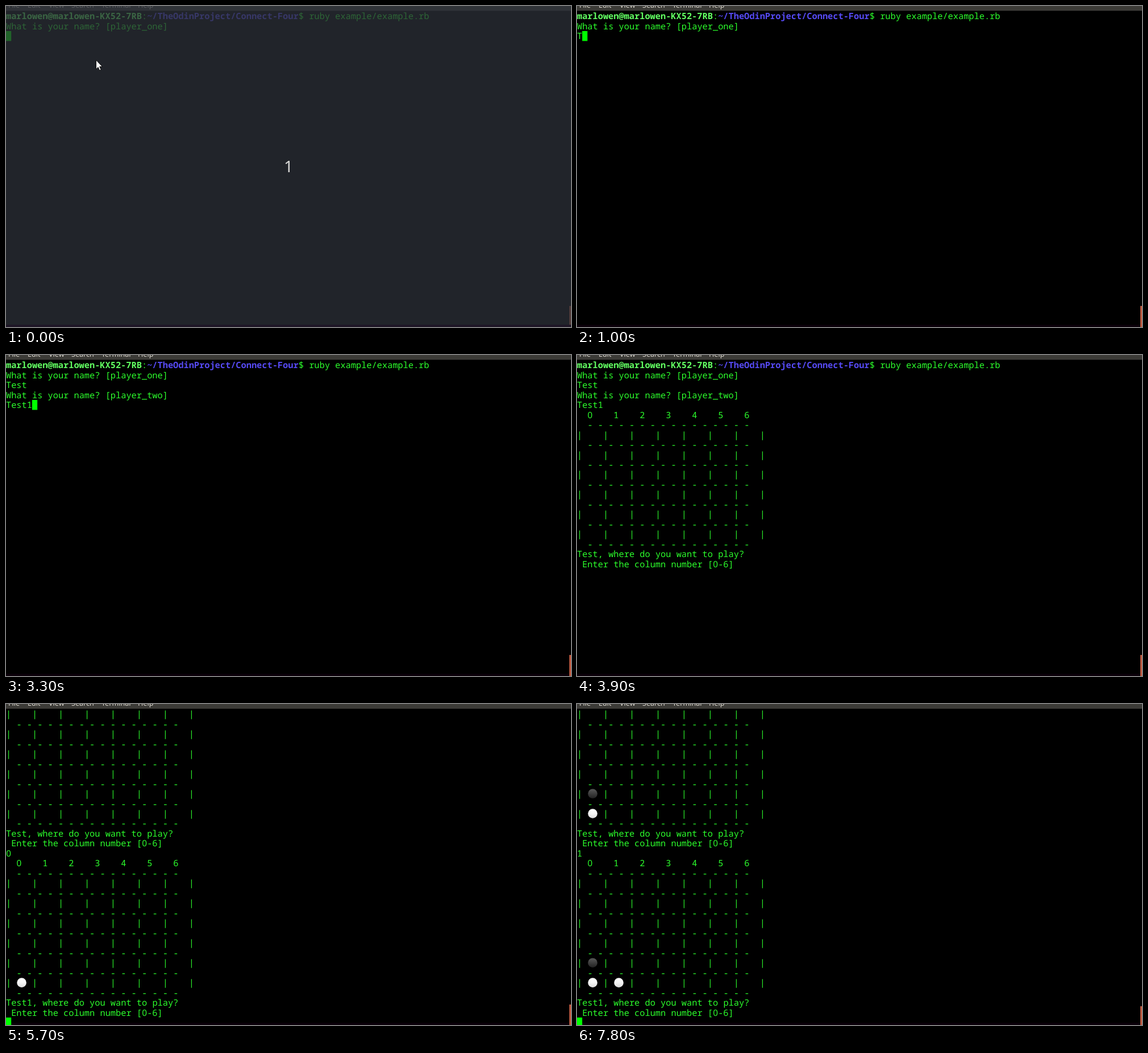
Animation, 994 px wide and 564 px high, one loop 8000 ms. Source, as an HTML page:

```html
<!DOCTYPE html>
<html lang="en">
<head>
<meta charset="utf-8">
<title>Connect Four in a terminal</title>
<style>
  html, body { margin: 0; width: 100%; height: 100%; overflow: hidden; background: #000; }
  svg { display: block; width: 994px; height: 564px; }
  text { white-space: pre; text-rendering: geometricPrecision; }
  #rows { font: 15.32px "Noto Sans Mono", "DejaVu Sans Mono", monospace; fill: #2cff2c; }
  .zero { font-family: "Noto Sans", "Open Sans", sans-serif; }
  .user { font-weight: 700; fill: #62ff62; }
  .path { font-weight: 700; fill: #564af4; }
  #menu { font: 12.6px "Noto Sans", "Open Sans", sans-serif; fill: #dfdbd2; }
  #count { font: 28px "Noto Sans", "Open Sans", sans-serif; fill: #dadad8; text-anchor: middle; }
</style>
</head>
<body>
<svg viewBox="0 0 994 564">
  <defs>
    <linearGradient id="white" x2="0" y2="1">
      <stop stop-color="#fff"/><stop offset=".5" stop-color="#f4f4f4"/><stop offset="1" stop-color="#dcdcdc"/>
    </linearGradient>
    <linearGradient id="black" x2="0" y2="1">
      <stop stop-color="#5a5a5a"/><stop offset="1" stop-color="#222"/>
    </linearGradient>
  </defs>
  <rect width="994" height="564"/>
  <rect y="560" width="994" height="4" fill="#0a0009"/>
  <rect id="caret" width="9.2" height="17.5" fill="#0f0"/>
  <g id="rows"></g>
  <rect id="thumb" x="991" width="3" height="40" fill="#bf5a41"/>
  <rect width="994" height="8.4" fill="#3c3b37"/>
  <g id="menu"></g>
  <path id="beam" d="M158 91.5h2.2m.8 0h2.5M158 103.5h2.2m.8 0h2.5M160.5 92v11" stroke="#ddd" fill="none"/>
  <g id="dim">
    <rect width="994" height="564" fill="#2c3038" opacity=".75"/>
    <rect y="560" width="994" height="4" fill="#1e1626"/>
    <text id="count" x="497" y="292">1</text>
    <path d="M158.5 95v16l3.6-3.4 2.5 5.6 2.6-1.2-2.5-5.4h4.8z" fill="#fff" stroke="#111"/>
  </g>
</svg>
<script>
const LOOP = 8000, CELL = 9.192, LINE = 17.48, TOP = 9, BASE = 14.2, ROWS = 32;
const $ = id => document.getElementById(id);

const menu = { File: 4, Edit: 38, View: 75, Search: 115, Terminal: 168, Help: 232 };
$('menu').innerHTML = Object.entries(menu)
  .map(([name, x]) => `<text x="${x}" y="3.3">${name}</text>`).join('');

// Discs are keyed "row,column", row 0 at the top of the board.
function board(discs = {}) {
  const rule = '  ' + '- '.repeat(16);
  const lines = ['  0    1    2    3    4    5    6', rule];
  for (let r = 0; r < 6; r++) {
    let line = '|';
    for (let c = 0; c < 7; c++) line += ` ${discs[r + ',' + c] || ' '}  |`;
    lines.push(line, rule);
  }
  return lines;
}

const ask = name => [`${name}, where do you want to play?`, ' Enter the column number [0-6]'];

const log = [
  [['marlowen@marlowen-KX52-7RB', 'user'], [':', ''], ['~/TheOdinProject/Connect-Four', 'path'],
   ['$ ruby example/example.rb', '']],
  'What is your name? [player_one]', 'Test',
  'What is your name? [player_two]', 'Test1',
  ...board(), ...ask('Test'), '0',
  ...board({ '5,0': '○' }), ...ask('Test1'), '0',
  ...board({ '5,0': '○', '4,0': '●' }), ...ask('Test'), '1',
  ...board({ '5,0': '○', '4,0': '●', '5,1': '○' }), ...ask('Test1')
];

// time, finished lines, typed text, caret shown
const steps = [
  [0, 2, '', 1], [100, 2, '', 0], [400, 2, '', 1],
  [1000, 2, 'T', 1], [1200, 2, 'Te', 1], [1300, 2, 'Test', 1],
  [1600, 4, '', 1], [2500, 4, 'T', 1], [2600, 4, 'Te', 1], [2800, 4, 'Test', 1], [3300, 4, 'Test1', 1],
  [3500, 21, '', 1], [3900, 21, '', 0], [5000, 21, '', 1], [5100, 21, '', 0], [5200, 21, '', 1],
  [5500, 21, '0', 1],
  [5700, 38, '', 1], [6300, 38, '', 0], [6700, 38, '', 1], [7000, 38, '0', 1],
  [7500, 55, '', 1], [7800, 72, '', 1]
];
const thumbTop = { 38: 528, 55: 529.5, 72: 531 };

function drawLine(line, row) {
  const y = TOP + row * LINE;
  let col = 0, spans = '', discs = '';
  for (const [text, style] of Array.isArray(line) ? line : [[line, '']]) {
    for (const { 0: part, index } of text.matchAll(/0|[○●]|[^0○● ]+/g)) {
      const x = (col + index) * CELL;
      if (part === '○' || part === '●') {
        const fill = part === '○' ? 'white' : 'black';
        discs += `<circle cx="${x + CELL}" cy="${y + 8.7}" r="8.3" fill="url(#${fill})"/>`;
      } else {
        const zero = part === '0';
        spans += `<tspan x="${x + (zero ? 0.2 : 0)}" class="${zero ? 'zero' : style}">${part}</tspan>`;
      }
    }
    col += text.length;
  }
  return `<text y="${y + BASE}">${spans}</text>${discs}`;
}

function drawStep([, count, typed, caretOn]) {
  const lines = [...log.slice(0, count), typed].slice(-ROWS);
  $('rows').innerHTML = lines.map(drawLine).join('');
  $('caret').setAttribute('x', typed.length * CELL);
  $('caret').setAttribute('y', TOP + (lines.length - 1) * LINE);
  $('caret').style.display = caretOn ? '' : 'none';
  $('thumb').setAttribute('y', thumbTop[count] || 527);
}

const show = (id, on) => { $(id).style.display = on ? '' : 'none'; };
const start = performance.now();
let current;

function tick() {
  const t = (performance.now() - start) % LOOP;
  const step = steps.findLast(s => s[0] <= t);
  if (step !== current) drawStep(current = step);
  show('dim', t < 100);
  show('beam', t >= 100 && t < 800);
  requestAnimationFrame(tick);
}
tick();
</script>
</body>
</html>
```
